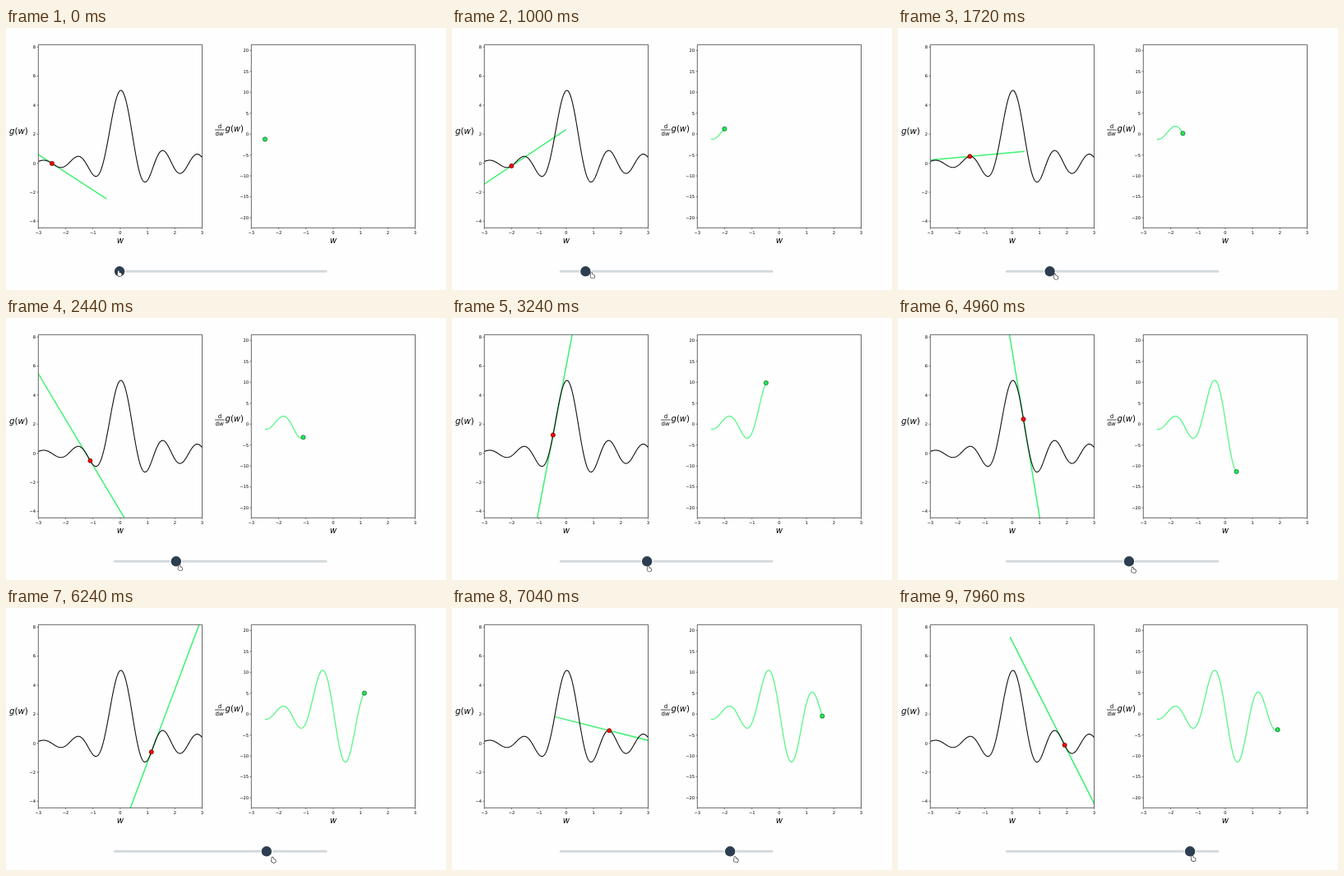
These frames come from a looping animation (535x319 px, 8 s). An HTML page with a canvas:

```html
<!DOCTYPE html>
<html lang="en">
<head>
<meta charset="utf-8">
<title>Derivative of a wave</title>
<style>
  html, body { margin: 0; width: 100%; height: 100%; overflow: hidden; background: #fefefe; }
  canvas { display: block; width: 535px; height: 319px; }
</style>
</head>
<body>
<canvas id="stage"></canvas>
<script>
const W = 535, H = 319, LOOP = 8000, START = -2.5;
const FONT = '"DejaVu Sans", sans-serif';
const canvas = document.getElementById('stage');
const ctx = canvas.getContext('2d');
const dpr = window.devicePixelRatio || 1;
canvas.width = W * dpr;
canvas.height = H * dpr;

// g(w) = e^(w/5) sin(5w) / w, and its exact slope
const sinc = w => Math.abs(w) < 1e-6 ? 5 : Math.sin(5 * w) / w;
const sincSlope = w => Math.abs(w) < 1e-3
  ? -125 / 3 * w
  : (5 * w * Math.cos(5 * w) - Math.sin(5 * w)) / (w * w);
const g = w => Math.exp(w / 5) * sinc(w);
const slope = w => Math.exp(w / 5) * (sincSlope(w) + sinc(w) / 5);

const TOP = 20.3, BOTTOM = 243.3, SPAN = 199.2;
const makePlot = (left, zero, unit, first, last, step) => ({
  left, first, last, step,
  x: w => left + (w + 3) * SPAN / 6,
  y: v => zero - v * unit
});
const leftPlot = makePlot(39.3, 164.6, 17.67, -4, 8, 2);
const rightPlot = makePlot(298.3, 129.2, 5.09, -20, 20, 5);

// The hand drags unevenly: [time, w]
const drag = [
  [0, START], [1000, -2.005], [2440, -1.1], [3400, -0.36], [4120, -0.042],
  [4960, 0.41], [5920, 0.84], [6240, 1.14], [6760, 1.47], [7960, 1.92]
];

function dragAt(t) {
  const i = Math.max(1, drag.findIndex(k => k[0] >= t));
  if (t >= drag.at(-1)[0]) return drag.at(-1)[1];
  const [t0, w0] = drag[i - 1], [t1, w1] = drag[i];
  return w0 + (w1 - w0) * (t - t0) / (t1 - t0);
}

function line(x1, y1, x2, y2, color, width) {
  ctx.beginPath();
  ctx.moveTo(x1, y1);
  ctx.lineTo(x2, y2);
  ctx.strokeStyle = color;
  ctx.lineWidth = width;
  ctx.stroke();
}

function curve(plot, fn, from, to, color, width) {
  const n = Math.max(2, Math.ceil((to - from) * 60));
  ctx.beginPath();
  for (let i = 0; i <= n; i++) {
    const w = from + (to - from) * i / n;
    ctx.lineTo(plot.x(w), plot.y(fn(w)));
  }
  ctx.strokeStyle = color;
  ctx.lineWidth = width;
  ctx.lineJoin = 'round';
  ctx.stroke();
}

function dot(x, y, r, fill, edge) {
  ctx.beginPath();
  ctx.arc(x, y, r, 0, Math.PI * 2);
  ctx.fillStyle = fill;
  ctx.fill();
  if (edge) {
    ctx.strokeStyle = edge;
    ctx.lineWidth = 0.6;
    ctx.stroke();
  }
}

function text(str, x, y, size, italic, align = 'left') {
  ctx.font = `${italic ? 'italic ' : ''}${size}px ${FONT}`;
  ctx.textAlign = align;
  ctx.fillStyle = '#000';
  ctx.fillText(str, x, y);
  return x + ctx.measureText(str).width;
}

// Letters slanted, brackets upright
function mathText(str, x, y, size) {
  for (const c of str) x = text(c, x, y, size, /[gw]/.test(c));
}

const label = v => String(v).replace('-', '\u2212');

function axes(plot) {
  const { left, first, last, step } = plot;
  ctx.strokeStyle = '#333';
  ctx.lineWidth = 0.75;
  ctx.strokeRect(left, TOP, SPAN, BOTTOM - TOP);
  for (let v = first; v <= last; v += step) {
    const y = plot.y(v);
    line(left - 1.8, y, left, y, '#333', 0.6);
    text(label(v), left - 3.2, y + 1.9, 5.2, false, 'right');
  }
  for (let w = -3; w <= 3; w++) {
    const x = plot.x(w);
    line(x, BOTTOM, x, BOTTOM + 1.8, '#333', 0.6);
    text(label(w), x, 250.9, 5.2, false, 'center');
  }
  text('w', plot.x(0), 262, 10.2, true, 'center');
}

function labels() {
  mathText('g(w)', 4, 129, 10.2);
  text('d', 260, 121.6, 7, false, 'center');
  line(254, 124, 265.8, 124, '#000', 0.7);
  mathText('dw', 254.6, 131.4, 7);
  mathText('g(w)', 266.6, 126, 10);
}

function tangent(w) {
  const m = slope(w), v = g(w), p = leftPlot;
  ctx.save();
  ctx.beginPath();
  ctx.rect(p.left, TOP, SPAN, BOTTOM - TOP);
  ctx.clip();
  line(p.x(w - 2), p.y(v - 2 * m), p.x(w + 2), p.y(v + 2 * m), '#3df272', 1.5);
  ctx.restore();
}

// A palm with one raised finger
function pointer(x, y) {
  const hand = new Path2D();
  hand.ellipse(x, y + 1, 2.6, 2.1, 0.3, 0, Math.PI * 2);
  hand.roundRect(x - 2.1, y - 3.4, 1.6, 4, 0.8);
  ctx.strokeStyle = '#333';
  ctx.lineWidth = 1.3;
  ctx.stroke(hand);
  ctx.fillStyle = '#fff';
  ctx.fill(hand);
}

function slider(w, t) {
  const x = 260.8 + 49.1 * w, y = 296.3;
  ctx.lineCap = 'round';
  line(132.3, y, 389, y, '#d3dadc', 3);
  ctx.lineCap = 'butt';
  dot(x, y, 7.4, '#fefefe');
  dot(x, y, 6.2, '#2c3e50');
  // The hand swings around the knob and sinks below it
  const sway = 5.5 + 3 * Math.cos(2 * Math.PI * (t - 1000) / 5240);
  pointer(x + sway * Math.min(1, t / 800), 299 + 8 * Math.sin(2.3 * t / LOOP));
}

function draw(t) {
  const w = dragAt(t);
  ctx.setTransform(dpr, 0, 0, dpr, 0, 0);
  ctx.fillStyle = '#fefefe';
  ctx.fillRect(0, 0, W, H);
  tangent(w);
  curve(leftPlot, g, -3, 3, '#111', 1.1);
  if (w > START) curve(rightPlot, slope, START, w, '#5bf488', 1.3);
  axes(leftPlot);
  axes(rightPlot);
  labels();
  dot(leftPlot.x(w), leftPlot.y(g(w)), 2.6, '#f00808', '#500');
  dot(rightPlot.x(w), rightPlot.y(slope(w)), 2.6, '#1fe950', '#042');
  slider(w, t);
}

function tick() {
  draw(performance.now() % LOOP);
  requestAnimationFrame(tick);
}
tick();
</script>
</body>
</html>
```
